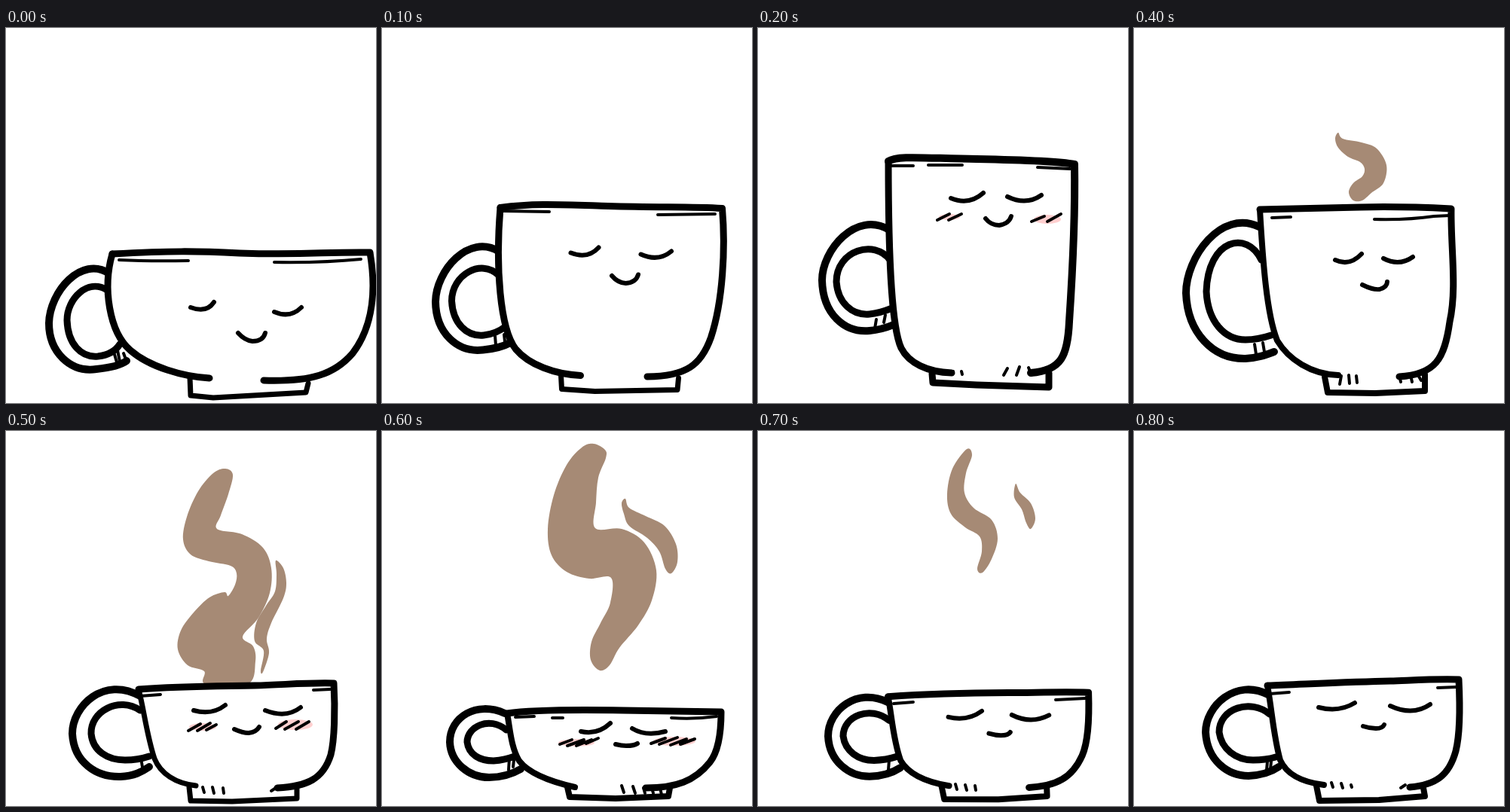
Write an HTML page that moves like this. It is 491 by 498 pixels and loops after 1.3 s.

```html
<!DOCTYPE html>
<html lang="en">
<head>
<meta charset="utf-8">
<title>Bouncing cup</title>
<style>
html, body { margin: 0; width: 100%; height: 100%; overflow: hidden; background: #fff; }
svg { display: block; width: 491px; height: 498px; }
path { fill: none; stroke: #000; stroke-linecap: round; stroke-linejoin: round; }
.fill { fill: #fff; }
.bare { stroke: none; }
.steam { fill: #a68a75; stroke: none; }
ellipse { fill: #ffcfcf; }
</style>
</head>
<body>
<svg id="stage" viewBox="0 0 491 498"></svg>
<script>
const stage = document.getElementById('stage');

const wide = {
  outer: 'M137 326 C100 302 58 350 57 392 C57 430 85 458 120 453 C140 451 152 448 160 442',
  inner: 'M134 348 C108 332 81 360 81 388 C82 420 100 438 122 436 C138 434 146 428 151 420',
  left: 'M270 465 C235 463 190 450 165 428 C137 404 128 345 141 300',
  right: 'M141 300 C220 296 250 296 310 299 C400 302 420 297 483 298 C491 345 488 395 460 432 C436 460 405 470 342 468',
  base: 'M244 464 L245 488 L275 491 L398 484 L401 472',
  face: 'M245 371 Q266 379 276 364 M356 377 Q377 386 392 371 M308 405 Q317 415 327 416 Q341 416 344 405',
  rim: 'M150 308 Q190 310 242 309 M356 311 Q420 312 471 307',
  marks: 'M143 430 L147 444 M148 428 L151 443 M156 432 L159 440',
  widths: [9, 9, 7]
};

const tall = {
  outer: 'M174 268 C130 242 85 295 85 335 C86 380 115 405 148 402 C160 401 168 399 180 394',
  inner: 'M175 308 C155 280 104 295 104 337 C106 365 125 382 148 380 C160 379 168 376 178 372',
  left: 'M257 458 C225 457 200 445 190 425 C176 395 173 290 173 177',
  right: 'M173 177 C185 169 220 173 290 174 C340 175 400 177 420 181 C421 240 417 330 413 390 C411 435 403 455 362 458',
  base: 'M231 459 L232 471 L290 474 L386 477 L386 458',
  face: 'M256 226 Q280 236 299 219 M331 224 Q356 236 376 222 M302 253 Q309 262 320 262 Q333 260 336 250',
  rim: 'M175 183 L206 183 M226 182 L271 182 M371 185 L414 187',
  marks: 'M259 456 L258 460 M270 456 L271 460 M331 452 L326 461 M347 450 L343 461 M359 451 L363 461 M157 387 L155 399 M169 381 L167 391',
  blush: 'M238 255 L254 247 M253 255 L270 247 M363 257 L380 250 M384 257 L402 247',
  pink: [[254, 251, 14, 4], [384, 254, 18, 6]],
  widths: [9, 10, 9]
};

const round = {
  outer: 'M166 264 C115 240 69 305 69 352 C71 405 105 440 148 439 C165 438 175 434 186 430',
  inner: 'M169 308 C150 268 98 280 96 350 C98 390 120 414 148 414 C160 414 170 412 182 408',
  left: 'M271 461 C235 460 205 440 190 415 C176 380 171 310 167 241',
  right: 'M167 241 C220 240 260 239 300 238 C340 237 380 238 421 240 C420 290 429 345 419 390 C412 440 400 460 352 463',
  base: 'M253 463 L257 484 L320 485 L386 482 L386 460',
  face: 'M267 308 Q286 317 302 300 M331 306 Q352 317 370 304 M303 341 Q317 348 326 347 Q336 344 336 337',
  rim: 'M183 252 L208 251 M319 254 Q365 255 398 250 L419 249',
  marks: 'M275 462 L273 473 M285 461 L286 472 M295 462 L296 471 M352 462 L354 470 M367 461 L369 470 M377 461 L381 468 M160 420 L162 433 M171 418 L173 430',
  steam: ['271 139 277 147 302 152 322 160 335 182 331 206 315 219 303 229 291 229 285 218 291 206 303 197 306 187 300 178 284 171 271 159 267 147'],
  widths: [8, 9, 8]
};

const low = {
  outer: 'M178 352 C130 325 88 365 88 402 C90 440 120 460 152 459 C170 458 180 453 190 446',
  inner: 'M178 371 C150 352 112 372 113 402 C115 425 135 437 158 437 C170 437 178 436 190 432',
  left: 'M252 471 C225 468 205 455 197 435 C187 405 183 370 176 343',
  right: 'M176 343 C230 339 280 339 330 338 C370 337 400 334 435 335 C437 370 436 410 431 430 C421 462 400 472 360 474',
  base: 'M243 473 L245 491 L300 492 L386 488 L386 475',
  face: 'M249 371 Q273 378 291 364 M344 371 Q372 382 391 367 M303 396 Q314 401 322 401 Q332 400 336 393',
  rim: 'M178 352 L205 350 M408 344 L430 343',
  marks: 'M261 473 L263 480 M274 473 L276 481 M288 474 L289 481 M352 478 L361 472 M180 440 L182 453',
  blush: 'M242 398 L258 389 M254 398 L271 388 M266 397 L279 390 M358 395 L372 386 M370 396 L388 386 M385 396 L402 386',
  pink: [[261, 393, 18, 5], [384, 390, 23, 7]],
  steam: [
    '291 50 301 58 295 84 285 112 280 130 313 137 341 155 352 182 350 215 335 248 314 273 328 286 331 306 321 336 265 336 263 319 241 311 228 290 232 265 249 241 270 221 290 214 295 219 304 204 306 189 298 179 269 173 245 164 235 144 240 114 255 80 275 56',
    '358 172 368 182 372 202 368 222 352 255 346 276 349 295 341 320 338 318 342 292 330 279 332 255 345 232 357 213 359 190'
  ],
  widths: [7, 9, 7]
};

const flat = {
  outer: 'M163 375 C125 358 90 380 90 413 C91 440 115 460 142 460 C160 460 172 456 184 449',
  inner: 'M165 397 C142 378 113 393 113 413 C115 430 130 438 148 438 C160 437 168 435 176 432',
  left: 'M256 473 C225 466 195 455 182 438 C171 420 170 395 166 375',
  right: 'M166 375 C200 370 260 370 320 371 C370 372 410 372 450 373 C450 400 447 425 435 440 C415 465 390 474 350 474',
  base: 'M246 473 L249 486 L310 488 L380 485 L382 474',
  face: 'M264 399 Q286 404 303 388 M332 395 Q350 406 376 399 M310 416 Q318 418 324 418 Q335 418 339 415',
  rim: 'M177 380 L202 379 M226 381 L240 381 M384 381 Q415 383 444 379',
  marks: 'M318 471 L321 480 M333 472 L336 481 M347 474 L349 481 M358 474 L360 481 M369 474 L371 483 M169 434 L168 450 M175 437 L174 446',
  blush: 'M236 416 L252 410 M246 418 L268 410 M258 418 L278 410 M271 415 L287 408 M357 415 L376 408 M368 416 L392 407 M383 417 L404 409 M396 416 L415 409',
  pink: [[258, 414, 24, 5], [388, 412, 28, 6]],
  steam: [
    '281 17 296 25 297 36 287 62 284 95 283 129 318 130 348 148 364 185 358 225 340 258 315 288 302 311 289 318 277 304 278 280 290 255 303 228 304 195 275 196 245 187 225 165 220 130 228 85 245 45 265 22',
    '323 90 328 102 350 113 375 126 390 150 392 174 384 189 376 183 368 160 352 142 328 126 321 110 318 96'
  ],
  widths: [8, 9, 8]
};

const rest = {
  outer: 'M178 350 C135 328 95 365 95 400 C97 438 125 458 152 458 C170 457 182 453 192 446',
  inner: 'M180 376 C155 355 113 368 113 400 C116 422 135 437 158 437 C170 437 178 436 188 433',
  left: 'M252 470 C220 466 202 455 194 437 C185 405 183 370 177 338',
  right: 'M177 338 C230 336 290 333 340 332 C370 331 400 329 431 330 C433 370 432 405 427 425 C418 458 400 470 366 473',
  base: 'M242 471 L246 491 L325 490 L386 485 L384 474',
  face: 'M245 367 Q272 374 293 361 M340 365 Q370 379 393 363 M304 392 Q313 395 321 395 Q330 395 332 390',
  rim: 'M180 349 L206 347 M403 341 L428 340',
  marks: 'M262 467 L264 473 M275 468 L277 474 M288 470 L289 473 M354 474 L360 470 M177 439 L176 450 M182 439 L181 449',
  widths: [8, 9, 8]
};

// Blend the numbers of two paths with the same commands.
function mix(a, b, t) {
  const to = b.match(/\d+/g);
  let i = 0;
  return a.replace(/\d+/g, n => (+n + (to[i++] - n) * t).toFixed(1));
}

function between(a, b, t, extra) {
  const pose = { widths: a.widths, ...extra };
  for (const key of ['outer', 'inner', 'left', 'right', 'base', 'face']) pose[key] = mix(a[key], b[key], t);
  return pose;
}

const rising = between(wide, tall, 0.5, {
  rim: 'M160 243 L222 244 M366 248 L442 247',
  marks: 'M150 409 L151 421 M162 407 L163 416'
});

const settling = between(flat, rest, 0.6, {
  rim: 'M180 362 L206 360 M395 357 L434 355',
  marks: 'M262 469 L264 476 M275 470 L277 477 M288 471 L289 477 M174 437 L173 450',
  steam: [
    '277 24 284 32 276 56 274 82 286 102 310 118 318 143 310 170 298 188 291 183 297 160 294 140 275 128 256 110 251 84 258 50',
    '342 70 348 82 362 96 368 116 362 130 356 122 350 104 340 88'
  ]
});

// Closed smooth curve through the given points.
function loop(text) {
  const n = text.split(' ').map(Number), count = n.length / 2;
  const at = i => { const k = (i + count) % count; return [n[2 * k], n[2 * k + 1]]; };
  let d = 'M' + at(0);
  for (let i = 0; i < count; i++) {
    const [p, a, b, q] = [at(i - 1), at(i), at(i + 1), at(i + 2)];
    const c1 = a.map((v, k) => v + (b[k] - p[k]) / 6);
    const c2 = b.map((v, k) => v - (q[k] - a[k]) / 6);
    d += 'C' + [c1, c2, b].join(' ');
  }
  return d + 'Z';
}

function add(parent, name, attrs) {
  const el = document.createElementNS('http://www.w3.org/2000/svg', name);
  for (const key in attrs) el.setAttribute(key, attrs[key]);
  return parent.appendChild(el);
}

function draw(pose) {
  const g = add(stage, 'g', { visibility: 'hidden' });
  const line = (d, width, cls = '') => add(g, 'path', { d, 'stroke-width': width, class: cls });
  const [leftWidth, rightWidth, baseWidth] = pose.widths;

  for (const s of pose.steam || []) line(loop(s), 0, 'steam');
  line(pose.outer, 10, 'fill');
  line(pose.inner, 9, 'fill');
  line(pose.base, baseWidth, 'fill');
  line(pose.left + pose.right.replace('M', 'L'), 0, 'fill bare');
  line(pose.left, leftWidth);
  line(pose.right, rightWidth);
  for (const [cx, cy, rx, ry] of pose.pink || []) add(g, 'ellipse', { cx, cy, rx, ry });
  line(pose.rim, 4);
  line(pose.marks, 4);
  line(pose.face, 6);
  if (pose.blush) line(pose.blush, 4);
  return g;
}

const steps = [
  [0, wide], [100, rising], [200, tall], [400, round],
  [500, low], [600, flat], [700, settling], [800, rest]
].map(([start, pose]) => ({ start, g: draw(pose) }));

let shown;
function tick() {
  const t = performance.now() % 1300;
  const { g } = steps.filter(s => s.start <= t).pop();
  if (g !== shown) {
    if (shown) shown.setAttribute('visibility', 'hidden');
    g.setAttribute('visibility', 'visible');
    shown = g;
  }
  requestAnimationFrame(tick);
}
tick();
</script>
</body>
</html>
```
